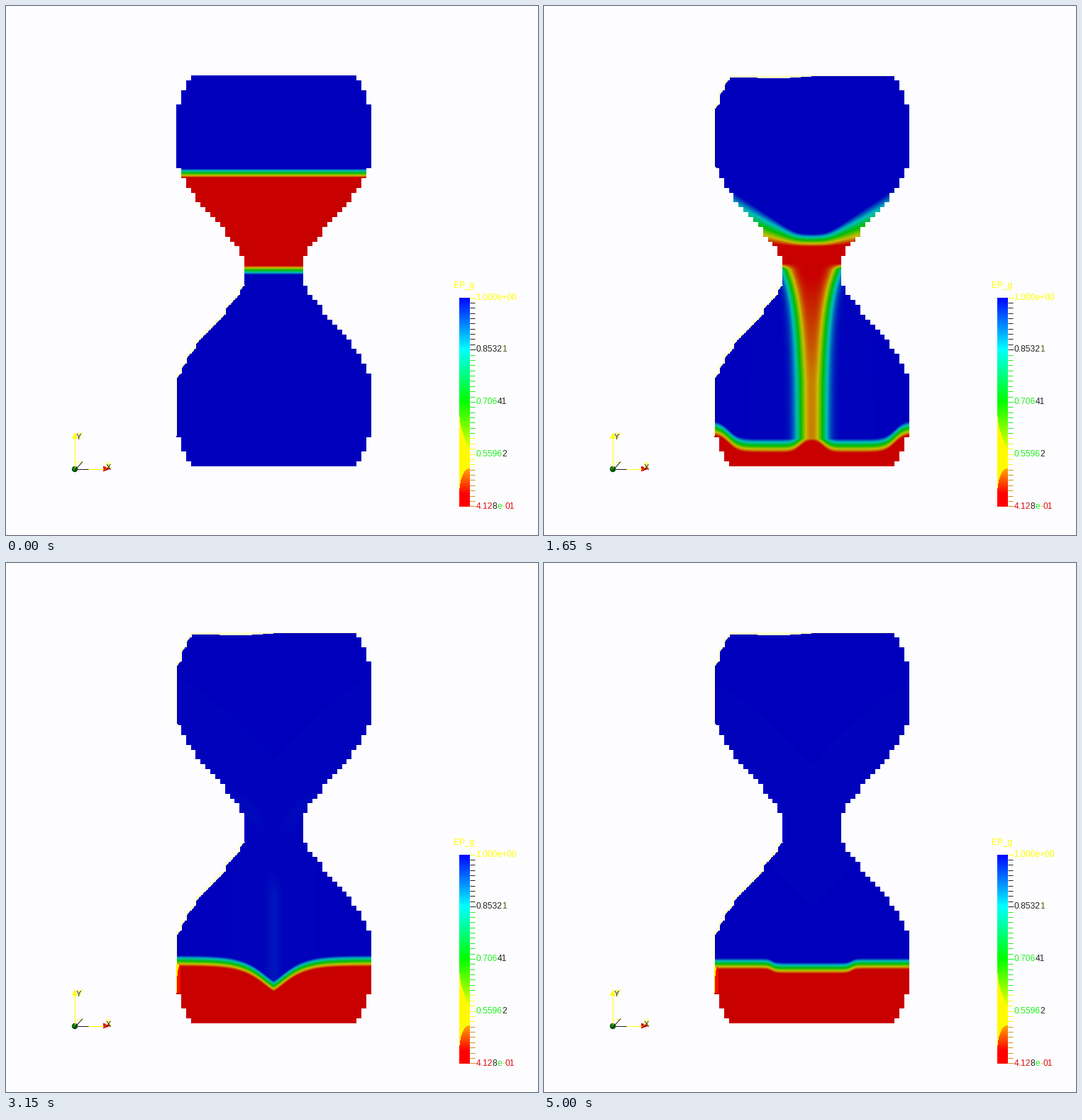
Write a matplotlib script that moves like this. It is 750 by 747 pixels and loops after 5050 ms.

```python
import numpy as np
import matplotlib.pyplot as plt
from matplotlib.animation import FuncAnimation
from matplotlib.patches import Circle, Polygon

W, H, DPI = 750, 747, 100
FRAMES, STEP = 101, 50
PX = 72 / DPI
CX = 377.4                      # axis of the hourglass
TOP, CELL_W, CELL_H = 98, 6.87, 6.9
X0, X1, Y0, Y1 = 230, 525, 93, 655
BACK = (253, 253, 255)
PALE = (255, 255, 205)

fig = plt.figure(figsize=(W / DPI, H / DPI), dpi=DPI,
                 facecolor=np.array(BACK) / 255)
ax = fig.add_axes([0, 0, 1, 1])
ax.axis("off")

# Wall of one bulb: half width steps out to 20 cells, then in to 7
bulb = np.repeat(np.r_[17:21, 19:6:-1],
                 [1, 2, 3, 13, 2, 2, 1, 2, 1, 1, 1, 1, 1, 2, 1, 1, 2])
rows = np.r_[bulb, np.full(6, 6), bulb[::-1]]

px = np.arange(X0, X1) + 0.5
py = np.arange(Y0, Y1) + 0.5
X, Y = np.meshgrid(px, py)
DX = np.abs(X - CX)

cell = np.floor((py - TOP) / CELL_H).astype(int)
wall = rows[np.clip(cell, 0, 79)] * CELL_W
in_rows = ((cell >= 0) & (cell < 80))[:, None]
inside = (DX <= wall[:, None]) & in_rows

# Softened left wall with a pale fringe
left = CX - wall
soft = np.convolve(np.pad(left, (6, 2), mode="edge"), np.ones(9) / 9, "valid")
soft = np.maximum(left, soft) + 1
strip = in_rows & (X > left[:, None] - 1) & (X < soft[:, None])
low_fringe = strip & (Y > 394) & (Y < 607)
lid = np.interp(px, [262, 340, 385, 494], [101, 102, 99, 99])
high_fringe = (strip & (Y < 229)) | (inside & (Y < lid))


def ramp(shade=(1, 1, 1), size=256):
    """Red, yellow, green, cyan, blue with a light level per channel."""
    v = 4 * np.linspace(0, 1, size)
    rgb = np.stack([2 - v, np.minimum(v, 4 - v), v - 2], 1)
    return (255 * np.clip(rgb, 0, 1) * shade).astype(np.uint8)


SAND = ramp((0.785, 0.745, 0.738))
BAR = ramp()


def unit(a):
    return np.clip(a, 0, 1)


def smooth(a):
    a = unit(a)
    return a * a * (3 - 2 * a)


def step_at(x, mid, width):
    return 1 / (1 + np.exp(-(x - mid) / width))


def pile_height(t, x):
    """Sand level in the lower bulb over the distance from the axis."""
    # heap that spreads, climbs the walls, then fills up around the jet
    base = np.interp(t, [0.85, 1.15, 1.65, 2.5], [668, 612, 621, 562])
    slope = 0.5 * unit((1.5 - t) / 0.35)
    climb = 26 * np.interp(t, [1.35, 1.65, 2.3], [0, 1, 0])
    depth = np.interp(t, [1.65, 2.5, 3.15], [0, 45, 36])
    close = smooth((t - 2.5) / 0.6)
    off = np.abs(x - 27 * (1 - close)) / 32
    dip = depth * np.exp(-off ** (2 - 0.7 * close))
    heap = base + slope * x - climb * step_at(x, 117, 7) + dip
    # final rest: a shallow terrace
    edge = 6 * unit((4.9 - t) / 1.1)
    rest = 566 + 6 * step_at(-x, -56, 3) - edge * step_at(x, 112, 8)
    k = smooth((t - 3.1) / 0.7)
    return heap + k * (rest - heap)


def gas_fraction(t):
    """0 is packed sand, 1 is empty gas."""
    # upper surface, sinking into a funnel
    c = np.interp(t, [0, 1.15, 1.65, 2.05], [236, 300, 331, 372])
    d = 6 * np.logaddexp(0, (DX - 22) / 6)
    slope = 0.4 * unit(t / 1.15)
    width = 13 + 5 * unit(t / 0.5)
    width = width * (1 + 0.03 * unit((t - 1.1) / 0.55) * d)
    upper = unit(0.5 + (c - slope * d - Y) / width)

    # last sand leaving the neck
    tail = np.zeros_like(Y)
    if t > 1.9:
        late = max(t - 2, 0)
        tail = unit(0.6 + (370 + 382 * late ** 2 - Y) / (30 + 380 * late))

    # falling jet, narrowing below the neck
    near = np.exp(-np.maximum(Y - 370, 0) / 50)
    core = np.maximum(0.17 * unit((Y - 380) / 150), tail)
    spread = (19.5 + 21 * near) * (1 - 0.6 * tail)
    jet = 1 - (1 - core) * np.exp(-(DX / spread) ** (2.4 + 2.5 * near))
    grown = unit(t / 0.25)
    jet = jet * unit((Y - 364) / 8) * grown
    front = 373 + 382 * t * t - 14 * grown * (DX / 41) ** 2
    head = unit(0.5 + (Y - front) / (13 + 30 * min(t, 1)))
    s = np.maximum(np.maximum(upper, tail), np.maximum(jet, head))

    # thin leftovers sliding off the funnel and down the axis
    film = 0.09 * unit((t - 1.9) * 5) * np.exp(-max(t - 2.3, 0) * 2.5)
    line_x = 52 - 0.7 * (Y - 325)
    s = s - film * np.exp(-((DX - line_x) / 16) ** 2 - ((Y - 350) / 35) ** 2)
    haze = 0.035 * unit(1 - abs(t - 3) / 0.6)
    s = s - haze * np.exp(-(DX / 10) ** 2) * unit((Y - 430) / 40)

    # sand of the pile adds to sand of the jet
    if t > 0.8:
        band = np.interp(t, [1.15, 1.65, 3], [27, 20, 16])
        s = s - unit(0.5 + (Y - pile_height(t, DX)) / band)
    return unit(s)


def render(t):
    s = gas_fraction(t)
    img = SAND[(s * 255).astype(int)]
    img[~inside] = BACK
    img[low_fringe] = PALE
    if t > 0:
        img[high_fringe] = PALE
    if t > 1.65:
        rim = inside & (X < 246) & (Y > 564) & (Y < 607) & (s < 0.2)
        lit = X > 241 + 5 * np.exp(-(Y - 565) / 8)
        img[rim & lit] = (245, 15, 0)
        img[rim & ~lit] = (255, 240, 0)
    return img


def color_bar():
    bx, by = np.meshgrid(np.arange(639, 654) + 0.5, np.arange(412, 707) + 0.5)
    img = BAR[(unit((706 - by) / 294) * 255).astype(int)]
    u = unit((bx - 639) / 14)
    img[by > 570 + 55 * np.sqrt(u)] = (255, 250, 0)
    heat = unit((by - 653) / 36)
    glow = np.stack([255 + 0 * heat, 165 * (1 - heat), 0 * heat], -1)
    hot = by > 653 + 38 * (1 - np.sqrt(1 - (1 - u) ** 2))
    img[hot] = glow[hot]
    return img


def text(x, y, s, color, size=12):
    ax.text(x, y, s, color=color, fontsize=size * PX, family="Liberation Sans",
            ha="left", va="baseline")


def label(y, *runs):
    x = 662.5
    for s, color in runs:
        text(x, y + 4.3, s, color)
        x += 12 * sum({".": 0.278, "+": 0.584, "-": 0.333}.get(ch, 0.556)
                      for ch in s)


def line(x, y, color, width=1):
    ax.plot(x, y, color=color, lw=width * PX, solid_capstyle="butt")


YELLOW, GREEN, RED, DARK = "#ffff00", "#20f020", "#e01010", "#222222"

view = ax.imshow(render(0), extent=(X0, X1, Y1, Y0), interpolation="nearest")
ax.imshow(color_bar(), extent=(639, 654, 707, 412), interpolation="nearest")
ax.set_xlim(0, W)
ax.set_ylim(H, 0)
ax.set_aspect("auto")

for i in range(41):
    y = 411.5 + i * 7.37
    color = (DARK if 0 < i < 11 else GREEN if 0 < i < 27
             else YELLOW if i < 33 else "#d09020")
    line([654, 662 if i % 10 == 0 else 660.5], [y, y], color)

text(631.5, 398, "EP_g", YELLOW)
label(411, ("1.000e+00", YELLOW))
label(484, ("0.8532", DARK), ("1", "#506010"))
label(558, ("0.706", GREEN), ("41", DARK))
label(632, ("0.5596", GREEN), ("2", DARK))
label(706, ("4.12", RED), ("8", DARK), ("e", GREEN), ("-", "#d0d020"),
      ("01", RED))

# Axis triad
line([97, 97], [652, 608], YELLOW)
line([100, 138], [653.5, 653.5], YELLOW)
line([100, 116], [653.5, 653.5], DARK)
ax.add_patch(Polygon([(97, 602), (93, 611), (101, 611)], color=YELLOW, lw=0))
ax.add_patch(Polygon([(148, 653.5), (137, 649.5), (137, 657.5)],
                     color=RED, lw=0))
ax.add_patch(Circle((97, 654), 4.2, color="#064a06", lw=0))
ax.add_patch(Circle((96, 653.5), 2, color="#0a8a0a", lw=0))
text(100, 611, "Y", YELLOW, 13)
text(99, 612, "Y", DARK, 11)
text(140, 653, "X", YELLOW, 13)
text(141, 655, "X", DARK, 11)
line([100, 108], [643.5, 643.5], YELLOW)
line([100, 108], [652.5, 643.5], DARK)


def update(i):
    view.set_data(render(i * STEP / 1000))
    return (view,)


anim = FuncAnimation(fig, update, frames=FRAMES, interval=STEP, repeat=True,
                     repeat_delay=0, init_func=lambda: update(0))
plt.show()
```
